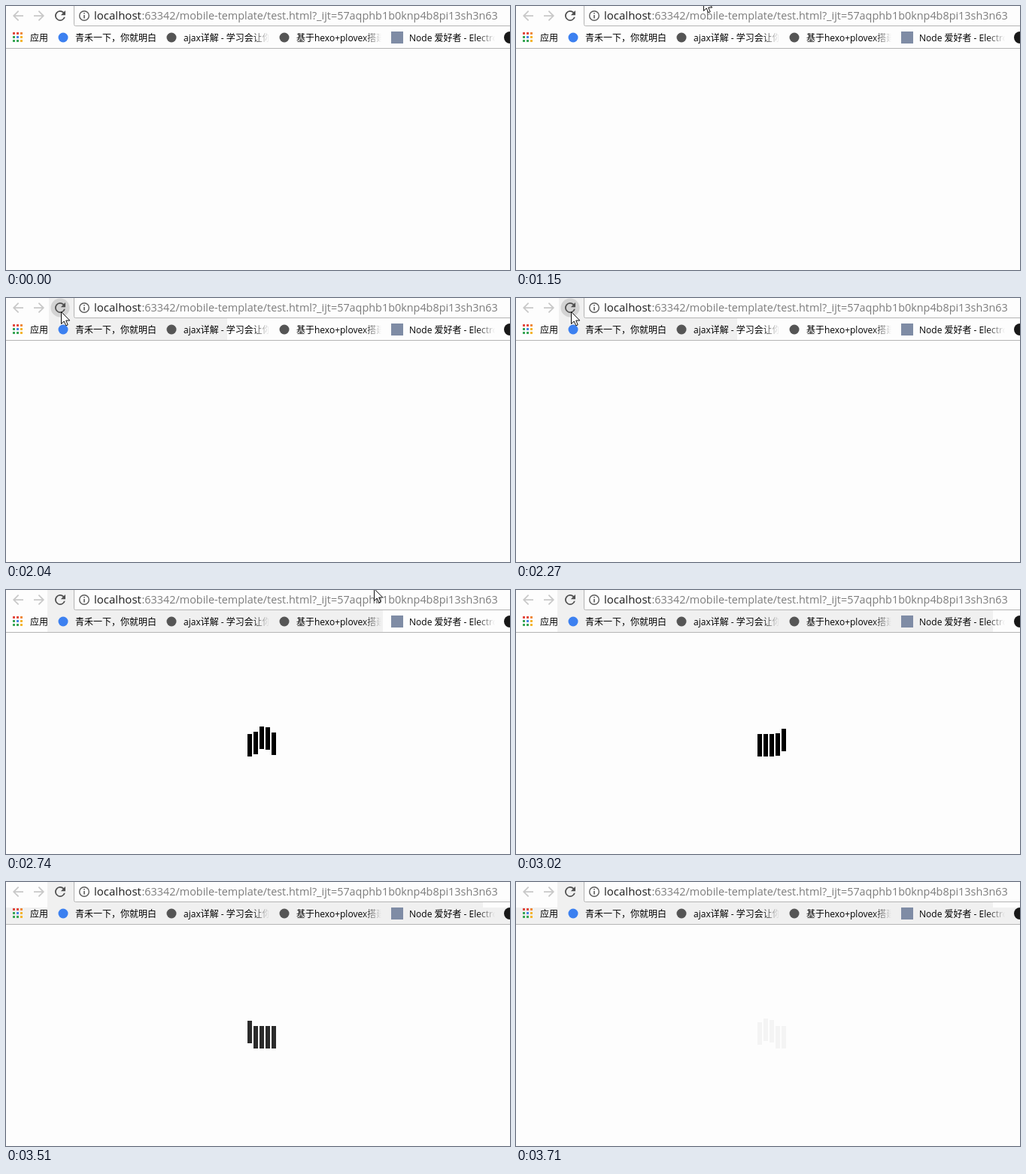
An HTML page that plays this animation: 670 px wide and 352 px high, repeating every 5.08 s.

```html
<!DOCTYPE html>
<html lang="zh-CN">
<head>
<meta charset="utf-8">
<title>Bar loader</title>
<style>
  html, body { margin: 0; width: 100%; height: 100%; overflow: hidden; background: #fdfdfd; }
  svg { display: block; }
  text { font: 12px 'Open Sans', 'Noto Sans CJK SC', 'Noto Sans CJK', sans-serif; white-space: pre; }
  .host { font-size: 15px; fill: #1c1c1c; }
  .path { font-size: 14.4px; fill: #7c7c7c; }
  .tip text { font: 11px 'DejaVu Sans Mono', monospace; fill: #e4e4e4; }
  .tip .tag { font-weight: bold; fill: #e36eec; }
</style>
</head>
<body>
<svg width="670" height="352" viewBox="0 0 670 352">
  <defs>
    <linearGradient id="fadeA" gradientUnits="userSpaceOnUse" x1="326" x2="350" y1="0" y2="0">
      <stop/><stop offset="1" stop-opacity="0"/>
    </linearGradient>
    <linearGradient id="fadeB" href="#fadeA" x1="474" x2="499"/>
    <linearGradient id="fadeC" href="#fadeA" x1="626" x2="650"/>
    <path id="arrow" d="M20 11H7.83l5.59-5.59L12 4l-8 8 8 8 1.41-1.41L7.83 13H20z" fill="#c8c8c8"/>
  </defs>
  <rect width="670" height="352" fill="#fdfdfd"/>

  <!-- toolbar tint and hover states -->
  <g fill="#f0f0f0">
    <rect id="tint" y="0" height="56"/>
    <rect id="strip" y="34" width="670" height="22"/>
  </g>
  <rect id="markHover" x="62" y="30" width="144" height="24" rx="2" fill="#e7e7e7"/>
  <g id="btnHover">
    <rect x="60" width="30" height="26" fill="#f0f0f0"/>
    <rect x="60" y="1" width="25" height="24" rx="3" fill="#dedede"/>
  </g>
  <circle id="btnDown" cx="72" cy="13" r="12.5" fill="#d3d3d3"/>

  <!-- address bar -->
  <path d="M90.5-2V24.5q0 2 2 2H672V-2z" fill="#fdfdfd" stroke="#b4b4b4"/>
  <use href="#arrow" transform="translate(5.5 2.5) scale(.875)"/>
  <use href="#arrow" transform="translate(54.5 2.5) scale(-.875 .875)"/>
  <path transform="translate(61.5 2.5) scale(.875)" fill="#505050"
    d="M17.65 6.35A8 8 0 1 0 19.73 14H17.65A6 6 0 1 1 16.22 7.78L13 11H20V4z"/>
  <circle cx="104" cy="13" r="6.3" fill="none" stroke="#5a5a5a" stroke-width="1.4"/>
  <path d="M104 12V16.5M104 9V10.6" stroke="#5a5a5a" stroke-width="1.6"/>
  <text class="host" x="117" y="18">localhost</text>
  <text class="path" x="180.5" y="18">:63342/mobile-template/test.html?_ijt=57aqphb1b0knp4b8pi13sh3n63</text>

  <!-- bookmarks -->
  <g id="apps"></g>
  <circle cx="76" cy="42" r="6.5" fill="#3c80f0"/>
  <circle cx="220" cy="42" r="6.5" fill="#555"/>
  <circle cx="370" cy="42" r="6.5" fill="#555"/>
  <rect x="512" y="34" width="16" height="16" fill="#7f8ca5"/>
  <circle cx="670" cy="42" r="8" fill="#181818"/>
  <text x="32" y="47">应用</text>
  <text x="92" y="47">青禾一下，你就明白</text>
  <text x="236" y="47" fill="url(#fadeA)">ajax详解 - 学习会让你</text>
  <text x="386" y="47" fill="url(#fadeB)">基于hexo+plovex搭建</text>
  <text x="536" y="47" fill="url(#fadeC)">Node 爱好者 - Electron</text>
  <rect y="56" width="670" height="1" fill="#b5b5b5"/>

  <g id="bars"></g>

  <g id="inspect" class="tip">
    <rect y="57" width="670" height="8" fill="#a8c5e6"/>
    <path d="M8 74L16 66L24 74H91q2 0 2 2V96q0 2-2 2H0V74z" fill="#33363c"/>
    <rect x="40" y="79" width="1" height="14" fill="#6c6e73"/>
    <text class="tag" x="7" y="90">html</text>
    <text x="48" y="90">681</text><text x="70" y="90">×</text><text x="79" y="90">8</text>
  </g>

  <path id="cursor" d="M.5.5V16.5L4.2 13L6.8 18.8L9.2 17.8L6.7 12H11.8z" fill="#fff" stroke="#111"/>
</svg>
<script>
const LOOP = 5080;
const $ = id => document.getElementById(id);

function rect(parent, x, y, w, h, fill) {
  const r = document.createElementNS('http://www.w3.org/2000/svg', 'rect');
  const attrs = { x, y, width: w, height: h, fill };
  for (const k in attrs) r.setAttribute(k, attrs[k]);
  return parent.appendChild(r);
}

const [red, orange, green, blue, yellow] = ['#e2493f', '#ef8a3a', '#3aa757', '#4a86e8', '#f4b52d'];
[red, red, orange, green, blue, yellow, green, green, yellow].forEach((c, i) =>
  rect($('apps'), 9 + i % 3 * 5, 35 + Math.floor(i / 3) * 5, 3, 3, c));

const bars = [0, 1, 2, 3, 4].map(i => rect($('bars'), 321 + i * 8, 192, 6, 30, '#000'));

// [start, end, step]: spans in which the screen refreshes
const SPANS = [[1150, 1610, 46], [2040, 2510, 58], [2570, 3070, 42.5], [3400, 3710, 44.25]];

// [time, x, y] of the pointer tip
const ENTER = [[1150, 249, -10], [1240, 214, 12], [1340, 150, 33], [1450, 100, 37], [1540, 78, 28], [1610, 73, 18]];
const LEAVE = [[2570, 80, 18], [2612, 150, 16], [2655, 270, 10], [2697, 390, 3], [2740, 489, -2], [2825, 622, -13], [2867, 660, -24]];

function snap(t) {
  for (const [a, b, step] of SPANS) {
    if (t >= a && t < b) return a + Math.floor((t - a) / step + 1e-6) * step;
  }
  return t;
}

function along(path, t) {
  if (t <= path[0][0]) return path[0].slice(1);
  for (let i = 1; i < path.length; i++) {
    const [t0, x0, y0] = path[i - 1], [t1, x1, y1] = path[i];
    if (t <= t1) {
      const k = (t - t0) / (t1 - t0);
      return [Math.round(x0 + (x1 - x0) * k), Math.round(y0 + (y1 - y0) * k)];
    }
  }
  return path[path.length - 1].slice(1);
}

// CSS "ease": cubic-bezier(.25, .1, .25, 1)
function ease(x) {
  let lo = 0, hi = 1;
  for (let i = 0; i < 18; i++) {
    const s = (lo + hi) / 2;
    const bx = .75 * s * (1 - s) + s * s * s;
    if (bx < x) lo = s; else hi = s;
  }
  const s = lo, u = 1 - s;
  return .3 * s * u * u + 3 * s * s * u + s * s * s;
}

function lift(p) {
  if (p <= 0 || p >= 480) return 0;
  return 10 * (p < 240 ? ease(p / 240) : 1 - ease((p - 240) / 240));
}

const show = (id, on) => $(id).setAttribute('visibility', on ? 'visible' : 'hidden');

function drawBars(t) {
  show('bars', t >= 2380);
  const clock = Math.min(t, 3710);
  const start = clock < 3395 ? 2307 : 3395;
  bars.forEach((b, i) => b.setAttribute('y', 192 - Math.round(lift(clock - start - i * 100))));
  const k = Math.max(0, Math.min(1, (clock - 3390) / 360));
  $('bars').setAttribute('opacity', .5 + .5 * Math.cos(Math.PI * k));
}

function drawTint(t, tipX) {
  const left = t < 2330 ? 57 : 55;
  const right = t < 2570 ? 294 : Math.max(294, Math.min(634, tipX + 12));
  show('tint', t >= 2040);
  $('tint').setAttribute('x', left);
  $('tint').setAttribute('width', right - left);
  show('strip', t >= 3100);
}

function draw(time) {
  const t = snap(time);
  const [x, y] = along(t < 2570 ? ENTER : LEAVE, t);
  show('cursor', t >= 1150 && t < 2867);
  $('cursor').setAttribute('transform', `translate(${x} ${y})`);
  drawTint(t, x);
  show('markHover', t >= 1334 && t < 2040);
  show('btnHover', t >= 1560 && t < 2040);
  show('btnDown', t >= 2040 && t < 2570);
  drawBars(t);
  show('inspect', t >= 3190 && t < 3240);
}

const begin = performance.now();
function tick() {
  draw((performance.now() - begin) % LOOP);
  requestAnimationFrame(tick);
}
tick();
</script>
</body>
</html>
```
